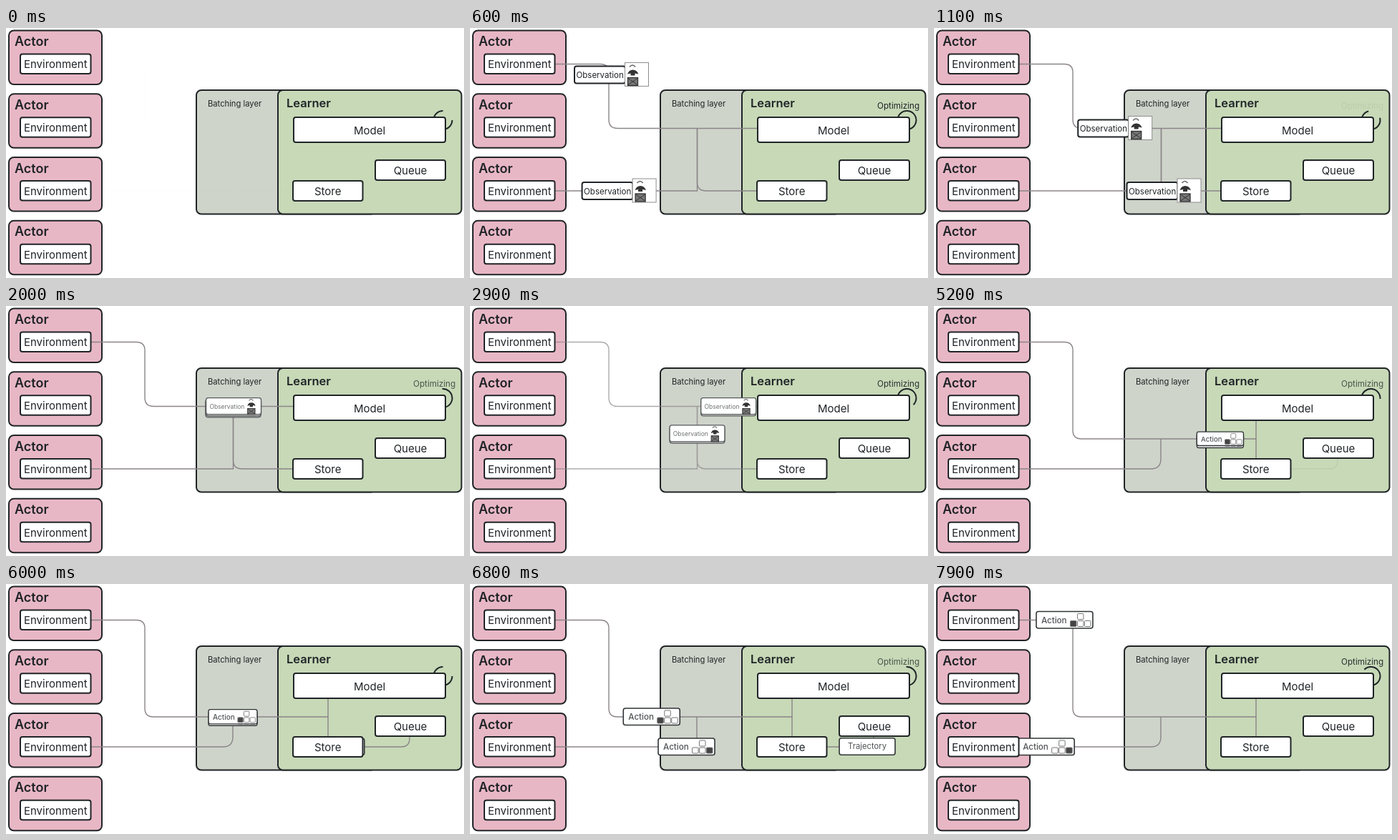
Recreate the animation shown at these times as an HTML page. Size 640 by 350 pixels, loop 8000 ms.

```html
<!DOCTYPE html>
<html lang="en">
<head>
<meta charset="utf-8">
<title>Actors and learner</title>
<style>
  html, body { margin: 0; width: 100%; height: 100%; overflow: hidden; background: #fff; }
  svg { display: block; width: 100vw; height: 100vh; }
  text { font-family: Inter, Roboto, sans-serif; fill: #202427; dominant-baseline: central; }
</style>
</head>
<body>
<svg id="stage" viewBox="0 0 640 350"></svg>
<script>
const LOOP = 8000, PULSE = 1200;
const INK = '#202427';
const stage = document.getElementById('stage');

function add(parent, tag, attrs, content) {
  const el = document.createElementNS('http://www.w3.org/2000/svg', tag);
  for (const key in attrs) el.setAttribute(key, attrs[key]);
  if (content) el.textContent = content;
  return parent.appendChild(el);
}
const group = () => add(stage, 'g', {});
const box = (parent, x, y, width, height, fill, stroke = INK, weight = 2, rx = 3) =>
  add(parent, 'rect', { x, y, width, height, rx, fill, stroke, 'stroke-width': weight });
const label = (parent, x, y, size, content, more = {}) =>
  add(parent, 'text', { x, y, 'font-size': size, ...more }, content);
const line = (parent, d) =>
  add(parent, 'path', { d, fill: 'none', stroke: '#8b8589', 'stroke-width': 1.4 });

function namedBox(parent, x, y, w, h, name) {
  box(parent, x, y, w, h, '#fff');
  label(parent, x + w / 2, y + h / 2 + .5, 15, name, { 'text-anchor': 'middle' });
}

// Piecewise linear value through [time, value] stops.
function at(t, stops) {
  if (t <= stops[0][0]) return stops[0][1];
  for (let i = 1; i < stops.length; i++) {
    const [t0, v0] = stops[i - 1], [t1, v1] = stops[i];
    if (t < t1) return v0 + (v1 - v0) * (t - t0) / (t1 - t0);
  }
  return stops[stops.length - 1][1];
}

// Large panels
const panels = group();
const actorTops = [3.5, 92.3, 181, 269.8];
actorTops.forEach(y => {
  box(panels, 4, y, 130, 75.5, '#e8b7c6', INK, 2, 7);
  label(panels, 12, y + 15, 18, 'Actor', { 'font-weight': 600 });
});
box(panels, 266, 87, 251, 173.5, '#ced4ca', INK, 2, 7);
label(panels, 282, 105.5, 11.2, 'Batching layer');
box(panels, 380, 87, 256.5, 173.5, '#c7d9b7', INK, 2, 7);
label(panels, 392, 105, 16.5, 'Learner', { 'font-weight': 600 });
const status = label(panels, 569, 108.5, 11.7, 'Optimizing');
const spinner = add(panels, 'path', { fill: 'none', stroke: INK, 'stroke-width': 2 });

// Connections
const observationLines = group(), actionLines = group(), trajectoryLine = group();
line(observationLines, 'M119 50.5H182Q194 50.5 194 62V128Q194 140.5 206 140.5H401');
line(observationLines, 'M119 228H317.5V140.5');
line(observationLines, 'M317.5 140.5V216Q317.5 228 330 228H401');
line(actionLines, 'M450 160V214');
line(actionLines, 'M450 186H206Q194 186 194 174V62Q194 50.5 182 50.5H119');
line(actionLines, 'M317 186V214Q317 228 303 228H119');
line(trajectoryLine, 'M499 228H552Q564 228 564 216V213');

// A part that travels along a path; stops give the distance covered.
function traveller(d, stops, build) {
  const path = document.createElementNS('http://www.w3.org/2000/svg', 'path');
  path.setAttribute('d', d);
  const g = group();
  const update = build(g) || (() => [1, 0]);
  return t => {
    const p = path.getPointAtLength(at(t, stops));
    const [scale, drop] = update(t);
    const shown = t >= stops[0][0] && t < stops[stops.length - 1][0];
    g.setAttribute('visibility', shown ? 'visible' : 'hidden');
    g.setAttribute('transform', `translate(${p.x} ${p.y + drop}) scale(${scale})`);
  };
}

const observation = under => g => {
  const stack = add(g, 'g', {});
  box(stack, -52, -13, 104, 31, '#ddd', '#55585a', 1.6, 4);
  box(stack, -52, -16, 104, 31, '#fff', '#55585a', 1.8, 4);
  const full = add(g, 'g', {});
  box(full, -48, -12, 71, 24, '#fff');
  box(full, 22.5, -17, 33, 33, '#fff', '#8d8d8d', 1, 0);
  const text = label(g, -45.5, .5, 11.5, 'Observation');
  // Small game scene: a ring, a dark cap, a crate
  add(g, 'path', { d: 'M29-11q4-5 8 0', fill: 'none', stroke: '#666', 'stroke-width': 1.6 });
  add(g, 'path', { d: 'M26-1q2-6 7.500-6t8 6l-5-1v3h-6v-3z', fill: '#333' });
  box(g, 26.500, 4, 14, 11, '#777', '#333', 1.3, 0);
  add(g, 'path', { d: 'M27 14l13-9M27 5l13 9', stroke: '#333', 'stroke-width': 1 });
  return t => {
    const k = at(t, [[1500, 0], [2000, 1]]);
    stack.setAttribute('opacity', k);
    full.setAttribute('opacity', 1 - k);
    text.setAttribute('opacity', 1 - .35 * k);
    return [1 - .26 * k, under ? at(t, [[1500, 0], [1900, 2], [2500, 2], [2700, 0]]) : 0];
  };
};

const action = (pressed, under) => g => {
  box(g, -39.5, -12, 79, 23.5, '#fff', '#303436', 1.6, 3);
  label(g, -32.5, 0, 11.6, 'Action', { 'font-weight': 500, fill: '#333' }).style.fill = '#505355';
  [[18, -9], [8, 1], [18, 1], [28, 1]].forEach(([x, y], i) =>
    box(g, x, y, 8.500, 8, i === pressed ? '#444' : '#fff', '#777', 1, 1));
  return t => {
    const k = at(t, [[5900, 0], [6400, 1]]);
    return [.825 + .175 * k, under ? 3 * (1 - k) : 0];
  };
};

const trajectory = g => {
  box(g, -39, -12, 78, 23.5, '#fff', '#303436', 1.6);
  label(g, 0, -.5, 11.3, 'Trajectory', { 'text-anchor': 'middle' }).style.fill = '#505355';
};

const travellers = [
  traveller('M66 228H317.5V140.5V216Q317.5 228 330 228H450',
    [[50, 0], [1050, 251.500], [1500, 251.500], [1900, 339], [2500, 339], [2900, 377], [3600, 555]],
    observation(true)),
  traveller('M66 50.5H182Q194 50.5 194 62V128Q194 140.5 206 140.5H450',
    [[50, 0], [1100, 264], [1500, 333], [2500, 333], [2900, 376], [3400, 464]],
    observation(false)),
  traveller('M450 142V228', [[3700, 0], [4200, 35], [4800, 86]], action(1, true)),
  traveller('M450 142V186H317V214Q317 228 303 228H66',
    [[3700, 0], [4200, 35], [5200, 94], [6000, 177], [6300, 177], [6800, 228], [7200, 318], [7900, 374], [8200, 400]],
    action(3, true)),
  traveller('M450 142V186H206Q194 186 194 174V62Q194 50.5 182 50.5H66',
    [[3700, 0], [4200, 35], [5200, 94], [6000, 177], [6300, 177], [6800, 240], [7200, 335], [7900, 438], [8200, 480]],
    action(1, false)),
  traveller('M450 228H552Q564 228 564 216V199',
    [[5900, 0], [6800, 105], [7250, 138]], trajectory)
];

// Small boxes cover the parts that slide into them
const front = group();
actorTops.forEach(y => namedBox(front, 20, y + 33, 98.5, 27.5, 'Environment'));
namedBox(front, 402, 125, 212, 35, 'Model');
namedBox(front, 516, 185, 98, 28, 'Queue');
namedBox(front, 401, 214, 97.5, 28, 'Store');

function drawSpinner(phase) {
  const turn = 360 * phase - 30 * Math.sin(2 * Math.PI * phase);
  const point = deg => {
    const a = deg * Math.PI / 180;
    return `${610.5 + 13 * Math.cos(a)} ${129 + 13 * Math.sin(a)}`;
  };
  spinner.setAttribute('d', `M${point(turn)}A13 13 0 1 1 ${point(turn + 270)}`);
}

function render(t) {
  const phase = t % PULSE / PULSE;
  drawSpinner(phase);
  status.setAttribute('opacity', (1 - Math.cos(2 * Math.PI * phase)) / 2);
  observationLines.setAttribute('opacity', at(t, [[0, 0], [300, 1], [2700, 1], [2900, .7], [3300, 0]]));
  actionLines.setAttribute('opacity', at(t, [[4250, 0], [4700, 1]]));
  trajectoryLine.setAttribute('opacity', at(t, [[5100, 0], [5800, 1], [7100, 1], [7400, 0]]));
  travellers.forEach(move => move(t));
}

const start = performance.now();
function tick(now) {
  render(Math.max(0, now - start) % LOOP);
  requestAnimationFrame(tick);
}
render(0);
requestAnimationFrame(tick);
</script>
</body>
</html>
```
